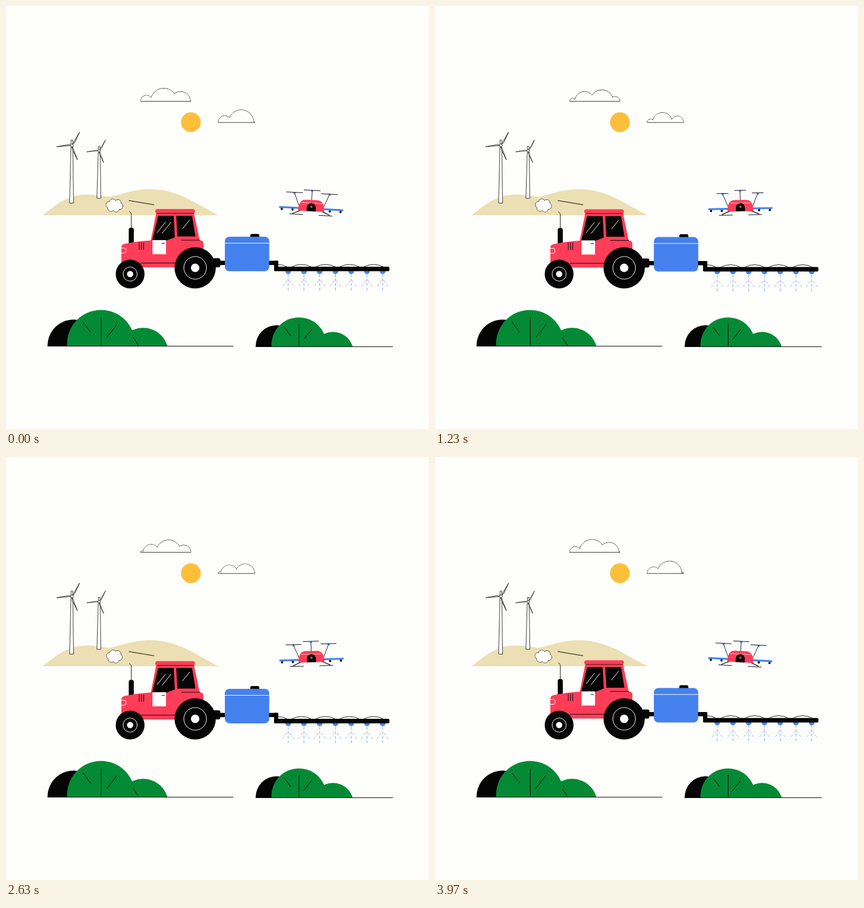
Recreate the animation shown at these times as an HTML page with a canvas. Size 748 by 748 pixels, loop 4 s.

```html
<!DOCTYPE html>
<html lang="en">
<head>
<meta charset="utf-8">
<title>Field sprayer</title>
<style>
html, body { margin: 0; width: 100%; height: 100%; overflow: hidden; background: #fefefd; }
canvas { display: block; }
</style>
</head>
<body>
<canvas id="stage" width="748" height="748"></canvas>
<script>
const ctx = document.getElementById('stage').getContext('2d');
const TAU = Math.PI * 2;
const RAD = Math.PI / 180;
const LOOP = 4000;
const BG = '#fefefd', INK = '#050505', RED = '#ff3d58', BLUE = '#4581ee';
const MIST = '#7ba3f0', GREEN = '#048a35', SAND = '#ebdfb3', SUN = '#fdbf3a';

function trace(pts) {
  ctx.beginPath();
  for (let i = 0; i < pts.length; i += 2) ctx.lineTo(pts[i], pts[i + 1]);
}

function line(color, width, ...pts) {
  trace(pts);
  ctx.strokeStyle = color;
  ctx.lineWidth = width;
  ctx.stroke();
}

function poly(fill, ...pts) {
  trace(pts);
  ctx.fillStyle = fill;
  ctx.fill();
}

function outlined(...pts) {
  poly(BG, ...pts);
  line(INK, 0.8, ...pts, pts[0], pts[1]);
}

function disc(x, y, r, fill) {
  ctx.beginPath();
  ctx.arc(x, y, r, 0, TAU);
  ctx.fillStyle = fill;
  ctx.fill();
}

function ring(x, y, r, color, width) {
  ctx.beginPath();
  ctx.arc(x, y, r, 0, TAU);
  ctx.strokeStyle = color;
  ctx.lineWidth = width;
  ctx.stroke();
}

function box(x, y, w, h, r, fill) {
  ctx.beginPath();
  ctx.roundRect(x, y, w, h, r);
  ctx.fillStyle = fill;
  ctx.fill();
}

function clipped(x, y, w, h, paint) {
  ctx.save();
  ctx.beginPath();
  ctx.rect(x, y, w, h);
  ctx.clip();
  paint();
  ctx.restore();
}

// Outline of the union of several circles
function blob(circles) {
  for (const [x, y, r] of circles) ring(x, y, r, INK, 0.8);
  for (const [x, y, r] of circles) disc(x, y, Math.max(0, r - 0.4), BG);
}

// Each puff grows and shrinks along the stops [x, radius], one stop per cycle
function cloud(base, stops, t) {
  const p = t / 800 - 0.04;
  const k = p - Math.floor(p);
  const mix = (a, b) => a + (b - a) * k;
  const puffs = stops.slice(1).map(([x, r], i) =>
    [mix(stops[i][0], x), base, mix(stops[i][1], r)]);
  clipped(0, 0, 748, base, () => blob(puffs));
  line(INK, 0.8, stops[0][0], base, stops[stops.length - 1][0], base);
}

function hill() {
  ctx.beginPath();
  ctx.moveTo(65, 370);
  ctx.bezierCurveTo(90, 350, 110, 334, 140, 333.5);
  ctx.bezierCurveTo(160, 333, 170, 336, 183, 337.5);
  ctx.bezierCurveTo(205, 333, 225, 324, 255, 324);
  ctx.bezierCurveTo(305, 324, 335, 350, 376, 370);
  ctx.fillStyle = SAND;
  ctx.fill();
}

function turbine(x, y, s, foot) {
  outlined(x - 1.7, y + 3, x + 1.7, y + 3, x + 3, foot, x - 4, foot);
  outlined(x - 1.5, y - 9.5 * s, x + 1.5, y - 9.5 * s, x + 1.5, y, x - 1.5, y);
  for (const angle of [175, 300, 69]) {
    ctx.save();
    ctx.translate(x, y);
    ctx.rotate(angle * RAD);
    ctx.scale(s, s);
    outlined(0, 0, 7, 1.9, 27, 0);
    ctx.restore();
  }
  disc(x, y, 2.6 * s, BG);
  ring(x, y, 2.6 * s, INK, 0.8);
}

function bush(x, base, s, end) {
  ctx.save();
  ctx.translate(x, base);
  ctx.scale(s, s);
  clipped(-200, -100, 400, 100, () => {
    disc(-48.5, -1, 46, INK);
    disc(0, -4, 60, GREEN);
    disc(74.5, 12, 44.5, GREEN);
  });
  line(INK, 1 / s, 0.5, -50, 0.5, -2);
  line(INK, 1 / s, -32, -43, -18, -24);
  line(INK, 1 / s, 28, -38, 10, -15);
  ctx.restore();
  line(INK, 1, x - 94.5 * s, base, end, base);
}

function smoke(t) {
  const k = 0.5 + 0.5 * Math.cos(TAU * t / 1000);
  const lobes = [];
  for (let i = 0; i < 6; i++) {
    const a = TAU * i / 6 + 0.2;
    lobes.push([191.7 + (8.2 + k) * Math.cos(a), 352.7 + 6 * Math.sin(a), 5.8]);
  }
  blob([...lobes, [191.7, 352.7, 6]]);
}

function wheel(x, y, r, rim, hub) {
  disc(x, y, r, INK);
  ring(x, y, rim, '#fff', 1);
  disc(x, y, hub, '#fff');
}

function nozzle(x, t) {
  ctx.setLineDash([5, 3]);
  ctx.lineDashOffset = -8 * t / 200;
  line(MIST, 1, x, 474, x, 504);
  for (const s of [-1, 1]) line(MIST, 0.8, x + s * 2, 485, x + s * 11, 498);
  ctx.setLineDash([]);
  disc(x, 469, 5, BLUE);
}

function sprayer(t) {
  for (let i = 0; i < 7; i++) nozzle(499 + i * 27.85, t);
  box(365, 446, 14, 16, 3, INK);
  box(377, 450.5, 12, 7.5, 1, INK);
  box(432, 403, 16, 9, 3, INK);
  box(387, 408, 78.5, 61, 8, BLUE);
  line('#fff', 1, 387, 419.5, 465.5, 419.5);
  box(465, 450.5, 16, 7.5, 1, INK);
  box(474, 450.5, 7.5, 18, 1, INK);
  box(474, 461, 204, 8, 2.5, INK);
  clipped(481, 440, 200, 21, () => {
    ctx.beginPath();
    for (let x = 480; x < 660; x += 42.5) {
      ctx.moveTo(x - 18, 461.5);
      ctx.quadraticCurveTo(x, 452.5, x + 18, 461.5);
    }
    ctx.strokeStyle = INK;
    ctx.lineWidth = 0.9;
    ctx.stroke();
  });
}

function tractor() {
  line(INK, 0.9, 221.5, 394, 221.5, 367, 218, 363);
  box(217, 392, 9, 32, 4, INK);

  ctx.beginPath();
  ctx.moveTo(204, 462);
  ctx.lineTo(204, 426);
  ctx.quadraticCurveTo(204, 422, 210, 420.5);
  ctx.quadraticCurveTo(230, 416, 256, 414.5);
  ctx.lineTo(266, 364);
  ctx.lineTo(332, 364);
  ctx.lineTo(342.5, 414);
  ctx.quadraticCurveTo(349, 414, 349, 420);
  ctx.lineTo(349, 462);
  ctx.fillStyle = RED;
  ctx.fill();
  box(264, 359, 70, 7.5, 3.5, RED);
  line(INK, 0.8, 267, 366.5, 332, 366.5);

  poly(INK, 269, 371, 296.5, 371, 298.5, 409, 283, 415, 258.5, 415);
  poly(INK, 301, 371, 329, 371, 335, 407.5, 303, 407.5);
  line('#fff', 1, 282, 382, 267, 401);
  line('#fff', 1, 292, 382, 276, 402);
  line('#fff', 1, 325, 378, 312, 394);

  box(259, 414, 24, 25, 0, '#fff');
  line(INK, 0.9, 275, 419.5, 281, 419.5);
  line(INK, 1, 310, 414, 343, 414);
  line(INK, 1, 238, 454.5, 306, 454.5);
  for (let i = 0; i < 3; i++) line(INK, 1, 235.5 + i * 4, 418, 235.5 + i * 4, 431);

  clipped(204, 420, 20, 24, () => {
    ctx.beginPath();
    ctx.roundRect(200, 428, 12, 9, 3);
    ctx.strokeStyle = '#fff';
    ctx.lineWidth = 1;
    ctx.stroke();
  });
}

function rotor(x, y, half) {
  disc(x, y + 1.5, 2, BLUE);
  line(INK, 1, x - half, y, x + half, y);
}

function drone(t) {
  const half = 12.2 + 2.5 * Math.cos(TAU * t / (LOOP / 15));
  ctx.save();
  ctx.translate(540, 354);
  ctx.rotate(3 * RAD * Math.cos(TAU * t / LOOP));
  line(INK, 0.9, 0, -27, 0, -10);
  for (const s of [-1, 1]) {
    line(INK, 0.9, s * 31, -22, s * 22, 0);
    box(s < 0 ? -57 : 21, 2.7, 36, 3.2, 1.5, BLUE);
    disc(s * 52, 7.6, 2, INK);
    disc(s * 33, 7.6, 2, INK);
    line(INK, 1.3, s * 18, 8, s * 33, 14.5);
    line(INK, 1, s * 14, 15.5, s * 38, 15.5);
    rotor(s * 31, -23, half);
  }
  rotor(0, -28, half);
  ctx.beginPath();
  ctx.moveTo(-23, 9);
  ctx.bezierCurveTo(-23, -5, -18, -11, -10, -11);
  ctx.lineTo(10, -11);
  ctx.bezierCurveTo(18, -11, 23, -5, 23, 9);
  ctx.fillStyle = RED;
  ctx.fill();
  line('#fff', 0.7, -18, -5.5, 18, -5.5);
  box(-8, -5.5, 16, 14.5, [8, 8, 0, 0], INK);
  disc(0, 1, 2, RED);
  ctx.restore();
}

function draw(t) {
  ctx.fillStyle = BG;
  ctx.fillRect(0, 0, 748, 748);

  cloud(168.5, [[238, 0], [249, 11], [280, 23.5], [310, 17], [327, 0]], t);
  disc(327, 205.5, 17.5, SUN);
  cloud(206, [[375, 0], [387.5, 12.5], [417, 22.7], [440, 0]], t);

  hill();
  turbine(116.5, 246.5, 1, 348.5);
  turbine(164.8, 256, 0.82, 340);
  smoke(t);
  line(INK, 1, 217, 344, 262, 351.5);

  ctx.save();
  ctx.translate(0, 2 * Math.abs(Math.sin(Math.PI * t / 400)));
  sprayer(t);
  tractor();
  ctx.restore();
  wheel(219.5, 474, 25.5, 12.5, 5.5);
  wheel(334.5, 463, 36.5, 20, 7.5);

  drone(t);

  bush(168, 601.5, 1, 402);
  line(INK, 1, 225, 586, 234, 600);
  bush(518, 602.5, 0.81, 684);
}

const start = performance.now();
function tick() {
  draw((performance.now() - start) % LOOP);
  requestAnimationFrame(tick);
}
tick();
</script>
</body>
</html>
```
